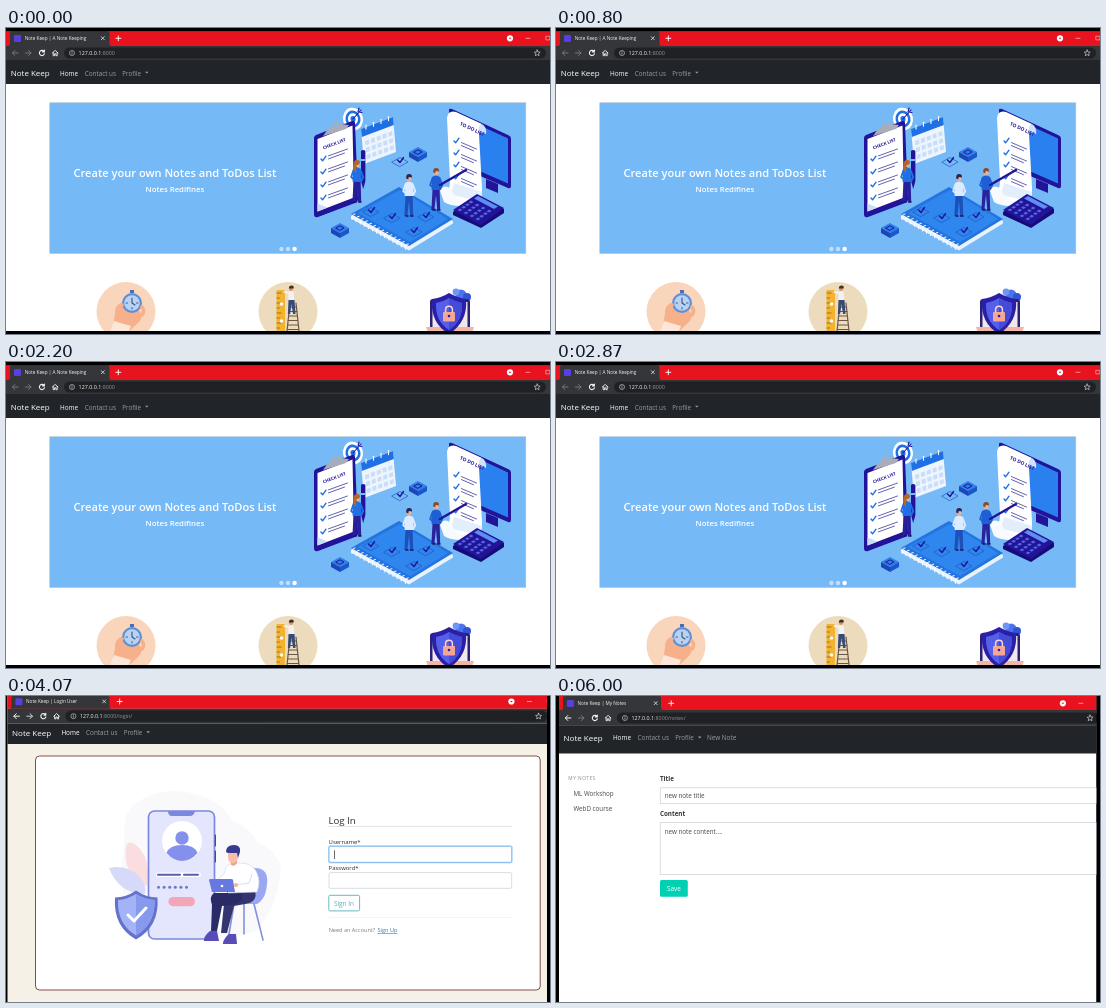
Animation, 544 px wide and 306 px high, one loop 8070 ms. Source, as an HTML page:

```html
<!DOCTYPE html>
<html lang="en">
<head>
<meta charset="utf-8">
<title>Note Keep</title>
<style>
  html, body { margin: 0; width: 100%; height: 100%; overflow: hidden; background: #000; }
  svg { display: block; width: 100%; height: 100%; }
  text { font-family: "Open Sans", "Noto Sans", sans-serif; white-space: pre; }
</style>
</head>
<body>
<svg id="stage" viewBox="0 0 544 306" xmlns="http://www.w3.org/2000/svg"></svg>
<script>
const LOOP = 8070;

const rect = (x, y, w, h, fill, more = '') => `<rect x="${x}" y="${y}" width="${w}" height="${h}" fill="${fill}" ${more}/>`;
const circle = (x, y, r, fill, more = '') => `<circle cx="${x}" cy="${y}" r="${r}" fill="${fill}" ${more}/>`;
const shape = (d, fill, more = '') => `<path d="${d}" fill="${fill}" ${more}/>`;
const line = (d, stroke, width = 1, more = '') =>
  `<path d="${d}" fill="none" stroke="${stroke}" stroke-width="${width}" stroke-linecap="round" stroke-linejoin="round" ${more}/>`;
const text = (x, y, size, fill, str, more = '') => `<text x="${x}" y="${y}" font-size="${size}" fill="${fill}" ${more}>${str}</text>`;
const group = (transform, body) => `<g transform="${transform}">${body}</g>`;
const repeat = (n, fn) => Array.from({ length: n }, (_, i) => fn(i)).join('');
const MEDIUM = 'font-weight="500"', SEMI = 'font-weight="600"', BOLD = 'font-weight="700"';

function browser({ dx, dy, left, right, top, tabEnd, barTop, navTop, navEnd, navY, title, path, back, forward, links = '' }) {
  const w = right - left;
  const controls =
    rect(8, 7, 7, 7, '#5a3fe0', 'rx="1.3"') +
    text(18.7, 12.1, 4.7, '#f1f3f4', title, MEDIUM) +
    line('M95.3 8.7l3 3m0-3l-3 3', '#e8eaed', .8) +
    line('M109.8 10.3h5m-2.5-2.5v5', '#fff', .9) +
    circle(504, 10.3, 3.1, '#fff') + shape('M502.7 9.7h2.6l-1.3 1.6z', '#d8101d') +
    line('M520 10.3h4', '#ffc5c8', .7) +
    line('M540.2 8.3h3.6v3.6h-3.6z', '#ffc5c8', .6);
  const tools =
    line('M12 25H6.5m2.4-2.5L6.4 25l2.5 2.5', back, 1) +
    line('M19.5 25H25m-2.4-2.5l2.5 2.5-2.5 2.5', forward, 1) +
    line('M38 23.3a2.6 2.6 0 1 0 .5 2.4M38.4 22v1.9h-1.9', '#f1f3f4', 1.1) +
    line('M46.4 25l2.8-2.6L52 25M47.2 24.5v3.2h1.3v-1.9h1.4v1.9h1.3v-3.2', '#f1f3f4', .9) +
    rect(58, 19.4, 482, 11.2, '#202124', 'rx="5.6"') +
    circle(66, 25, 2.5, 'none', 'stroke="#bdc1c6" stroke-width=".7"') +
    line('M66 24.8v1.3M66 23.7v.1', '#bdc1c6', .7) +
    text(72.6, 27, 5.35, '#f1f3f4', `127.0.0.1<tspan fill="#8d9196">:8000${path}</tspan>`, MEDIUM) +
    line('M531.2 22l.9 2 2.1.2-1.6 1.4.5 2.1-1.9-1.1-1.9 1.1.5-2.1-1.6-1.4 2.1-.2z', '#e8eaed', .6);
  const nav =
    text(4.7, 0, 8, '#fff', 'Note Keep', MEDIUM) +
    text(54, -.4, 6.4, '#fff', 'Home', MEDIUM) +
    text(78.7, -.4, 6.35, '#9b9d9f', 'Contact us', MEDIUM) +
    text(116.3, -.4, 6.2, '#9b9d9f', 'Profile', MEDIUM) +
    shape('M139 -4.2h3.6l-1.8 1.9z', '#9b9d9f') + links;
  return rect(left, top, w, barTop - top, '#e8131f') +
    shape(`M${left + 2} ${barTop}q2 0 2-2V${top + 1.5}q0-1.5 1.5-1.5H${tabEnd - 2}q1.5 0 1.5 1.5V${barTop - 2}q0 2 2 2z`, '#35363a') +
    rect(left, barTop, w, navTop - barTop, '#35363a') +
    rect(left, navTop, w, navEnd - navTop, '#212529') +
    group(`translate(${dx} ${dy})`, controls + tools) +
    group(`translate(${dx} ${navY})`, nav);
}

const NAVY = '#21149a', BLUE = '#1f6fe5', SKY = '#75b9f6', SKIN = '#f3b38d';

// Slanted checklist rows: a tick and two text strokes each
const ticks = (x, y, n, gap, width, slope) => repeat(n, i => {
  const t = y + i * gap;
  return line(`M${x} ${t}l1.6 1.8 3.4-4.6`, BLUE, 1.4) +
    line(`M${x + 7.5} ${t - 1 + 6 * slope}l${width} ${width * slope}m-3 ${3 - 3 * slope}l${3 - width} ${(3 - width) * slope}`, '#3a3a9c', .8);
});

const cube = (x, y) =>
  shape(`M${x - 9} ${y - 2}l9-5 9 5-9 5z`, '#2f7fe8') +
  shape(`M${x - 9} ${y - 2}l9 5v5l-9-5z`, '#1c45b8') +
  shape(`M${x + 9} ${y - 2}l-9 5v5l9-5z`, '#1a56cc') +
  line(`M${x - 4} ${y - 2}l4-2.2 4 2.2-4 2.2z`, NAVY, 1);

const tickTile = (x, y) =>
  line(`M${x - 8} ${y}l8-4.5 8 4.5-8 4.5z`, '#2058c0', .7) + line(`M${x - 2.5} ${y - 2}l2.5 2.5 3.5-5`, NAVY, 1.4);

const person = (x, y, shirt, trousers, hair) =>
  shape(`M${x - 3.4} ${y + 17}h7l.6 22h-3l-1.2-15-1.6 15h-3z`, trousers) +
  shape(`M${x - 4} ${y + 6}q4-3 8 0l.6 13h-9z`, shirt) +
  line(`M${x - 3.4} ${y + 7}l-2.4 7 3.4 3M${x + 3.6} ${y + 7}l2.6 7-2 4`, shirt, 1.9) +
  circle(x, y + 1.5, 2.5, SKIN) +
  shape(`M${x - 2.8} ${y + 1.5}q-.4-4.4 3-4.4t2.6 3.6q-2.6-1.3-3.4 0v1.8z`, hair) +
  line(`M${x - 3} ${y + 39}h2M${x + 1.6} ${y + 39}h2.4`, '#20165e', 1.5);

function hero() {
  const target = group('rotate(-12 347 91)',
    repeat(4, i => `<ellipse cx="347" cy="91" rx="${10 - i * 2.5}" ry="${11.4 - i * 2.8}" fill="${i % 2 ? BLUE : '#fff'}"/>`)) +
    line('M347 91l8-9m-2-2l-1 4 4 .5', NAVY, 1.1);
  const calendar =
    shape('M355 101l32-12 3 35-32 12z', '#eef5ff') + shape('M355 101l32-12 .8 8-32 12z', BLUE) +
    repeat(4, i => line(`M${360 + i * 7.5} ${101 - i * 2.8}v-4`, '#fff', 1.1)) +
    repeat(15, i => {
      const c = i % 5, r = Math.floor(i / 5);
      return shape(`M${359 + c * 5.8 + r * .7} ${113 - c * 2.15 + r * 7}l4-1.5.4 4.4-4 1.5z`, '#c9def8');
    });
  const clipboard =
    shape('M308 110q0-2 2-3l36-14q3-1 3 2l3 76q0 3-3 4l-37 14q-4 1-4-3z', NAVY) +
    shape('M311.5 111l35-13.5 1.5 72-36.5 14z', '#fff') +
    shape('M317 108l5-7 4-2q1-5 4-5 3 0 4 2l9 1-3 4z', '#a9adb8') + circle(330, 97.6, 1.3, SKY) +
    group('translate(317.5 121.5) rotate(-21)', text(0, 0, 4.4, NAVY, 'CHECK LIST', BOLD)) +
    ticks(315, 131, 4, 13, 19, -.36) +
    shape('M311.5 183.5v-8l10 4z', '#c8ddf6');
  const pen = shape('M355 123q2.2-2 4.4 0v30l-2.2 8-2.2-8z', NAVY) + rect(355, 131, 4.4, 2, '#76b7ff');
  const notebook =
    shape('M345 188l48-27 54 32v2.5l-44 27-58-32z', '#e9f3ff') +
    shape('M345 186l48-27 54 32-44 27z', '#2474e0') +
    shape('M352 185l42-23 48 29-38 23z', '#2f86ee') +
    repeat(14, i => line(`M${349 + i * 4.1} ${186 + i * 2.3}q-4 0-3 5.5`, '#fff', 1)) +
    tickTile(386, 190) + tickTile(408, 204) + tickTile(365, 184) + tickTile(420, 189);
  const monitor =
    shape('M443 82q0-2 3-1l56 26q3 1 3 4v47q0 3-3 2l-58-25z', NAVY) +
    shape('M446 84.5l56 26v45l-55-24z', '#2b80f0') +
    shape('M480 151l12 5v9l-12-5z', NAVY);
  const scroll =
    shape('M441 90q1-8 9-6l26 12q-4 3-3 10l3 54q1 13-9 17l-30-10q7-3 7-14z', '#fff') +
    shape('M476 96q5 3 4 10l-7-2q-1-6 3-8z', '#cfe2fb') +
    shape('M442 166l30 7q4-2 4-9l-28-9q-1 8-6 11z', '#e3eefc') +
    shape('M434 163q2-6 8-4l4 4q3 9 21 14-20 3-29-3z', '#f7faff') +
    group('translate(453.5 97) rotate(25)', text(0, 0, 4.9, NAVY, 'TO DO LIST', BOLD)) +
    ticks(448, 113, 4, 12, 15, .43);
  const calculator =
    shape('M447 184l24-17 27 14v4l-23 15-28-13z', '#160b78') +
    shape('M447 182l24-16 27 14-23 17z', NAVY) +
    shape('M468 170.5l4-2.5 20 10.5-4 2.5z', '#5f8df0') +
    repeat(16, i => {
      const c = i % 4, r = Math.floor(i / 4);
      return shape(`M${451.5 + c * 6 + r * 3.7} ${182 + c * 3 - r * 2.6}l2.4-1.6 2.6 1.3-2.4 1.6z`, '#5368dc');
    });
  const woman = person(351, 135, BLUE, '#26209a', '#b2672f') + shape('M348 134q3-4 5.6 0l-1 3h-2l-.6 8q-3-1-2-11z', '#b2672f');
  const writer = person(430, 143, '#1e5fd6', '#2a23a0', '#8a4a30') + line('M434 157l26-15', NAVY, 2.4);
  const art = target + calendar + clipboard + pen + woman + tickTile(394, 134) + cube(412, 126) + cube(334, 202) +
    monitor + scroll + notebook + person(403, 149, '#dcebff', '#1d50b8', '#2b2455') + calculator + writer;
  const dots = repeat(3, i => circle(275.4 + i * 6.6, 221, 2.2, '#fff', `opacity="${i === 2 ? 1 : .55}"`));
  return rect(43.8, 74.8, 476, 150.6, SKY, 'stroke="#a3bed6" stroke-width=".6"') + art +
    text(67.5, 149.2, 11.08, '#fff', 'Create your own Notes and ToDos List', SEMI) +
    text(139.6, 164, 7.75, '#fff', 'Notes Redifines', SEMI) + dots;
}

function features() {
  const watch =
    circle(120, 283.5, 29.5, '#f9d5bb') +
    shape('M106 303l3-17q-1-8 6-11l8-4q4 0 3 4l8 9q4 5-2 11l-11 10z', '#f6b18b') +
    shape('M103 306l5-13 17 5-4 10z', '#fbe6d9') +
    circle(126, 275, 10, '#5e8fd6') + circle(126, 275, 7.8, '#b9d2f4') + rect(124, 262, 4, 3, '#4a6fb0') +
    line('M126 270v5l3 2', '#34527f', 1.1) +
    line('M120 275h1.5M130.5 275h1.5M126 281v-1.5', '#34527f', .9) +
    line('M112 290q-2-8 4-13M117 288q5 3 10 1M136 279q3 4 0 8', '#f6b18b', 3.6);
  const ladder =
    circle(282, 283.5, 29.5, '#ecdcbd') +
    rect(270.5, 262, 8.5, 44, '#f3b32f', 'rx="1"') +
    repeat(8, i => line(`M271 ${265 + i * 5}h${i % 2 ? 2.4 : 4}`, '#8a5d1c', .8)) +
    circle(275.5, 276, 1.8, '#fff') + circle(275.5, 293, 1.8, '#fff') +
    line('M281 303l3-28M293 303l-3-28', '#6a5648', 1.2) +
    repeat(6, i => line(`M${283.6 - i * .45} ${279 + i * 4.5}h${7 + i * .8}`, '#6a5648', 1)) +
    shape('M282.5 264q3-2 5 0l1 9h-6z', '#f1f2f5') + shape('M282.5 272h6l1 14h-2.4l-1.6-10-1.4 10h-2.2z', '#364a74') +
    line('M283.5 265l-5-1', '#f1f2f5', 1.8) + circle(285, 261, 2, '#d89069') + shape('M282.8 260.6q0-3 2.8-3t2 3z', '#40302d');
  const laptop =
    circle(455, 267, 5.5, '#4a74ee') + circle(461, 269, 4, '#2f55d6') + circle(450, 264, 3.4, '#6f95f7') +
    shape('M424 274q0-3 3-3h34q3 0 3 3v27h-40z', '#2a2179') + rect(426.5, 274, 35, 27, '#f2e7ea') +
    shape('M420 299h48l-2 6h-44z', '#f1b6a6') +
    shape('M443 265q9 5 17 6 2 23-17 35-19-11-17-35 9-1 17-6z', '#2a1fa6') +
    shape('M443 270q7 4 13 5 1 18-13 27-14-9-13-27 7-1 13-5z', '#5560ea') +
    shape('M443 270q7 4 13 5 1 18-13 27z', '#434bd8') +
    rect(437, 284, 12, 9.5, '#f6a793', 'rx="1"') + line('M439.6 284v-2.4q0-3.4 3.4-3.4t3.4 3.4v2.4', '#fbd3c8', 1.5) +
    circle(443, 288, 1.3, '#2a1fa6');
  return watch + ladder + laptop;
}

function home() {
  return rect(0, 3, 544, 300, '#fff') + hero() + features() +
    browser({ dx: 0, dy: 0, left: 0, right: 544, top: 3.6, tabEnd: 104, barTop: 18, navTop: 32, navEnd: 56, navY: 47.9,
      title: 'Note Keep | A Note Keeping', path: '', back: '#74777b', forward: '#74777b' }) +
    rect(0, 0, 544, 3.6, '#000') + rect(0, 303, 544, 3, '#000');
}

function loginArt() {
  const INK = '#292b67', LILAC = '#8390ec';
  const backdrop = shape('M119 136q-4-24 22-35 24-10 48-3 24 5 38 27 18 7 25 22 13 3 23 22-3 43-24 65-28 12-78 10-48-1-51-28-10-17-3-80z', '#f9f9fc') +
    shape('M120 150q3-7 11 0 14 12 10 40-25-12-21-40z', '#f9dddf') +
    shape('M103 172q17-4 30 8 8 9 6 18-26 0-36-26z', '#d6daf8');
  const phone = rect(142.5, 115, 66, 128, '#e3e6fc', 'rx="6" stroke="#7c88df" stroke-width="1.7"') +
    shape('M162 115h27q-1 5-5 5h-18q-4 0-4-5z', '#7c88df') + line('M209.3 139v11m0 5v11', INK, 1) +
    circle(176, 145, 20, '#fff') + circle(176, 142, 6.7, LILAC) + shape('M160.5 157q3-8 15.5-8t15.5 8q-7 8-15.5 8t-15.5-8z', LILAC) +
    rect(150, 176.6, 45, 4.5, '#fff', 'rx="2"') + line('M152 178.8h22m4 0h14', '#555fae', 2) +
    repeat(6, i => circle(152.5 + i * 5.6, 191.2, 1.5, '#6e78c8')) +
    rect(162.5, 201, 26.5, 9.2, '#f2a6b8', 'rx="4.6"');
  const shield = shape('M130 194.5q10 7 21.5 7 2 29-21.5 42-23-13-21-42 11 0 21-7z', '#6472cc') +
    shape('M130 198q9 5.5 18.5 6 1 24-18.5 35.5-19-11.5-18-35.5 9-.5 18-6z', '#a4b3f6') +
    shape('M130 198q9 5.5 18.5 6 1 24-18.5 35.5z', '#8799ed') + line('M122 219l6 6 12-13', '#fff', 3);
  const chair = shape('M236 177q3-6 14-5 13 1 11 16-1 15-10 20h-22q-9-1-7-8l14-3z', '#9aa7f1') +
    line('M228 208l-6 36M248 208l9 36M238 208v30', '#8390dc', 1.6);
  const man = shape('M223 195h26q3 11-10 13l-11 2-7 27h-6l3-29q0-10 5-13z', '#34356f') +
    shape('M208 197h27q4 10-10 12l-9 1-5 25h-6l1-26q-3-9 2-12z', INK) +
    shape('M220 171q6-6 14-4 13 0 17 10 4 9 0 19l-29 1-2-12-8 3-1-4 7-6z', '#fff', 'stroke="#cfd4ef" stroke-width=".6"') +
    line('M246 178l-3 9-13 2', '#cfd4ef', .8) + circle(212, 186, 2, SKIN) + circle(230, 189, 2, SKIN) +
    shape('M224 161h7v6q-2 4-6 2z', '#efa28d') + shape('M222 154h10v8q-2 6-6 5-4-1-4-6z', '#f9bda8') +
    shape('M220 156q0-7 8-7 7 0 6 7l-2 6-1-5h-9z', '#363a91') +
    shape('M198 243q1-4 6-8h7l2 10h-15zM217 247q1-5 6-9h7l1 10h-14z', '#5a4cb8') +
    shape('M203 184q0-1 2-1h20q2 0 2 1l2 12h-23z', '#6778df') + circle(216, 190, 1.3, '#fff');
  return backdrop + phone + shield + chair + man;
}

function login() {
  const rule = y => line(`M323 ${y}H505.5`, '#d5d6d8', .7);
  const field = (y, h, stroke) => rect(323, y, 182.7, h, '#fff', `rx="1.3" stroke="${stroke}" stroke-width=".8"`);
  return rect(1.5, 0, 539.5, 306, '#f5f1e6') +
    rect(29.5, 60, 504.7, 234, '#fff', 'rx="4" stroke="#743c38" stroke-width=".9"') + loginArt() +
    text(322.4, 127.5, 9.7, '#292d31', 'Log In') + rule(130.4) +
    text(322.6, 148.3, 5.95, '#292d31', 'Username*') +
    rect(322, 149.2, 184.7, 18.2, '#c5dffc', 'rx="2"') + field(150.3, 16, '#65aee9') +
    line('M328.5 154.7v8', '#24282c', .7) +
    text(322.6, 174.1, 5.95, '#292d31', 'Password*') + field(176.6, 15.7, '#ced4da') +
    rect(322.8, 199.3, 30.8, 15.6, '#fff', 'rx="1.4" stroke="#55b4bd" stroke-width=".9"') +
    text(328, 209.5, 6.4, '#4eb0ba', 'Sign In', MEDIUM) + line('M323 221.5H505.5', '#eeeff0', .6) +
    text(322.7, 236.2, 5.55, '#777d83', 'Need an Account?') +
    text(371.4, 236.2, 5.65, '#3577b7', 'Sign Up', 'text-decoration="underline"') +
    browser({ dx: 1.4, dy: -4.8, left: 1.5, right: 541, top: 0, tabEnd: 104, barTop: 12.8, navTop: 27.5, navEnd: 48, navY: 39.5,
      title: 'Note Keep | Login User', path: '/login/', back: '#f1f3f4', forward: '#d0d2d5' }) +
    rect(541, 0, 3, 306, '#000');
}

function notes() {
  const field = (y, h) => rect(104.3, y, 440, h, '#fff', 'stroke="#d5d6d8" stroke-width=".8"');
  return rect(3, 0, 537.5, 306, '#fff') +
    text(12.3, 83.7, 4.8, '#85898d', 'MY NOTES', 'letter-spacing=".5"') +
    text(17.4, 100.2, 6.25, '#4a4a4a', 'ML Workshop') +
    text(17.4, 115.3, 6.25, '#4a4a4a', 'WebD course') +
    text(104, 85.4, 6.25, '#363636', 'Title', BOLD) + field(91.8, 15.8) +
    text(108.7, 102.2, 6.27, '#484848', 'new note title') +
    text(104, 120.3, 6.25, '#363636', 'Content', BOLD) + field(126.4, 52.2) +
    text(108.7, 138.2, 6.27, '#484848', 'new note content....') +
    rect(104, 184, 27.8, 16.8, '#00d1b2', 'rx="1.6"') + text(111, 194.6, 6.4, '#fff', 'Save') +
    browser({ dx: 2.9, dy: -3, left: 3, right: 540.5, top: 0, tabEnd: 105.5, barTop: 14, navTop: 29.2, navEnd: 57.5, navY: 44.8,
      title: 'Note Keep | My Notes', path: '/notes/', back: '#f1f3f4', forward: '#74777b',
      links: text(148, -.4, 6.4, '#9b9d9f', 'New Note', MEDIUM) }) +
    rect(540.5, 0, 3.5, 306, '#000');
}

const scenes = [
  { draw: home, from: 0, to: 3000 },
  { draw: login, from: 3000, to: 6000 },
  { draw: notes, from: 6000, to: LOOP },
];

const stage = document.getElementById('stage');
stage.innerHTML = scenes.map(s => `<g opacity="0">${rect(0, 0, 544, 306, '#000')}${s.draw()}</g>`).join('');

scenes.forEach(({ from, to }, i) => {
  const steps = [[0, from === 0 ? 1 : 0], [from, 1], [to, 0], [LOOP, 0]];
  stage.children[i].animate(
    steps.map(([t, opacity]) => ({ offset: t / LOOP, opacity, easing: 'step-end' })),
    { duration: LOOP, iterations: Infinity }
  ).startTime = document.timeline.currentTime;
});
</script>
</body>
</html>
```
